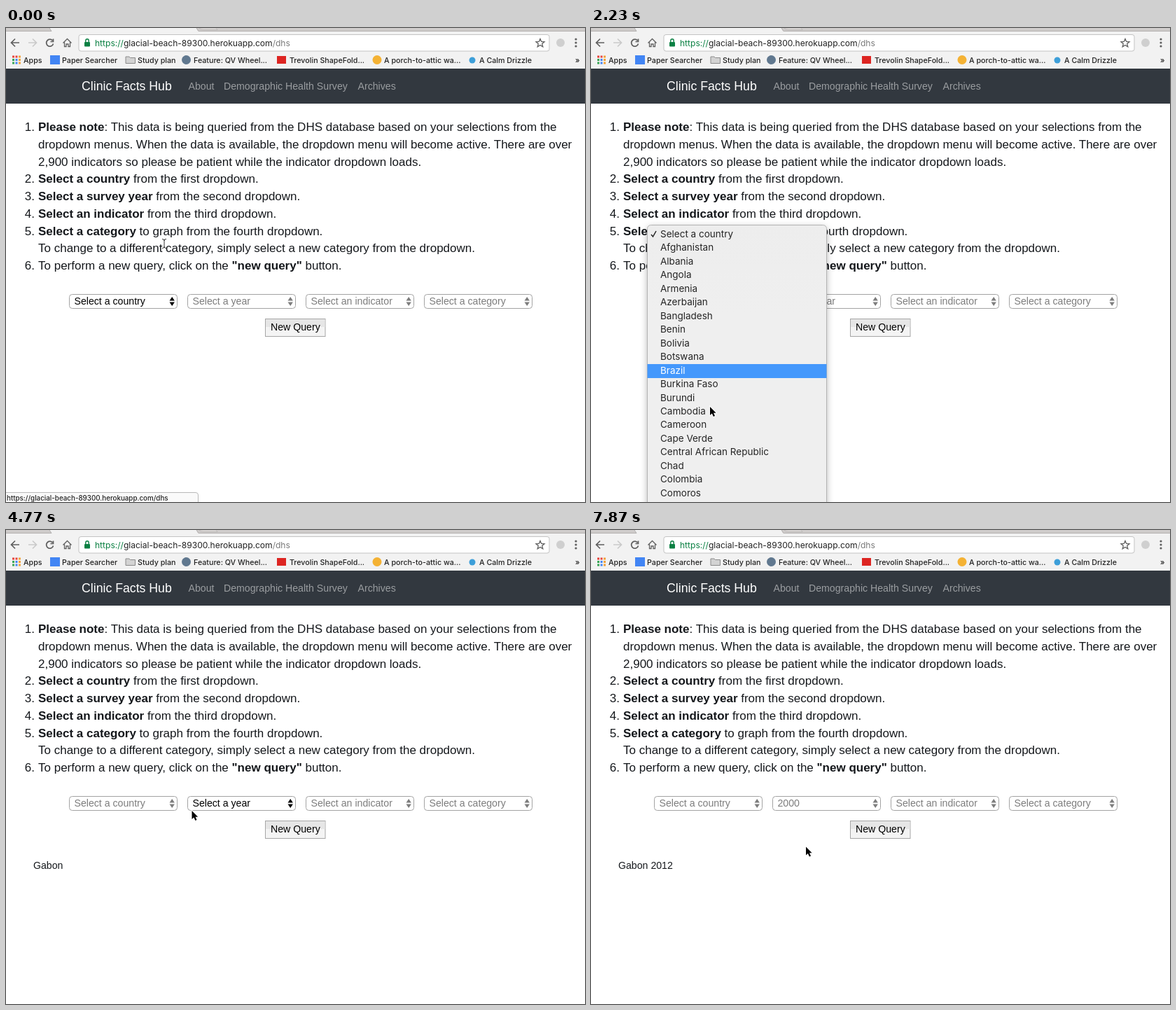
An HTML page for the animation above (8 s loop, 827 by 677 pixels).

```html
<!DOCTYPE html>
<html lang="en">
<head>
<meta charset="utf-8">
<title>Survey query form</title>
<style>
html, body { margin: 0; width: 100%; height: 100%; overflow: hidden; background: #fff; }
svg { display: block; width: 827px; height: 677px; }
.page { font: 14.15px "Liberation Sans", Arial, sans-serif; }
.list { font-size: 17px; fill: #15181c; }
.bold { font-weight: bold; }
.ui { font-family: Inter, Roboto, sans-serif; }
.marks { font-size: 10.7px; font-weight: 500; fill: #222; }
.menu { font: 13.5px Inter, Roboto, sans-serif; fill: #252525; }
.menu .on { fill: #fff; }
.panel { stroke: #b4b4b4; filter: drop-shadow(0 3px 5px rgba(0,0,0,.28)); }
.tick { fill: none; stroke: #222; stroke-width: 1.5; }
.line { fill: none; stroke: #5f5f5f; stroke-width: 1.7; }
.thin { stroke-width: 1.3; }
</style>
</head>
<body>
<svg viewBox="0 0 827 677">
  <defs>
    <linearGradient id="glass" gradientUnits="userSpaceOnUse" x1="0" y1="0" x2="0" y2="677">
      <stop offset="0" stop-color="#dedede"/>
      <stop offset=".07" stop-color="#e3e3e3"/>
      <stop offset=".1" stop-color="#d6d8d9"/>
      <stop offset=".135" stop-color="#d0d2d4"/>
      <stop offset=".17" stop-color="#e2e3e4"/>
      <stop offset=".22" stop-color="#ebebeb"/>
      <stop offset=".6" stop-color="#efefef"/>
    </linearGradient>
  </defs>
  <rect width="827" height="677" fill="#fff"/>

  <!-- browser window -->
  <g class="ui">
    <rect width="827" height="58" fill="#f2f2f2"/>
    <path d="M0 0H62L65 4.500H0ZM272 0H827V4.500H274Z" fill="#cfcccb"/>
    <path d="M0 4.500H65L62 0M272 0l3 4.500H827" fill="none" stroke="#b3b0af"/>
    <path d="M276 0h24l2 2.500h-20q-4 0-6-2.500" fill="#dedbd9" stroke="#b3b0af" stroke-width=".7"/>
    <path class="line" d="M19 21H8M13 15.500L7.500 21L13 26.500"/>
    <path class="line" style="stroke:#cacaca" d="M32 21H43M38 15.500L43.500 21L38 26.500"/>
    <path class="line" d="M66.500 18A5 5 0 1 0 67.500 22.500M67.500 15.500V19.500H63.500"/>
    <path class="line thin" d="M81.500 21.500L87.500 15.500L93.500 21.500M83.500 20.500V26.500H86V23H89V26.500H91.500V20.500"/>
    <rect x="104" y="9.500" width="672" height="23.500" rx="3" fill="#fff" stroke="#c3c3c3"/>
    <rect x="112" y="20" width="8" height="6.500" rx="1" fill="#0b8043"/>
    <path d="M113.800 20V18a2.200 2.200 0 0 1 4.400 0V20" fill="none" stroke="#0b8043" stroke-width="1.400"/>
    <text x="127" y="26" font-size="12.050" fill="#222"><tspan fill="#0b8043">https://</tspan>glacial-beach-89300.herokuapp.com<tspan fill="#7a7a7a">/dhs</tspan></text>
    <path class="line thin" d="M763 15.500l1.700 4 4.300.3-3.300 2.800 1.100 4.200-3.800-2.300-3.800 2.300 1.100-4.200-3.300-2.800 4.300-.3z"/>
    <circle cx="792" cy="21" r="6" fill="#cfcfcf"/>
    <g fill="#5f5f5f"><circle cx="814" cy="16" r="1.600"/><circle cx="814" cy="21" r="1.600"/><circle cx="814" cy="26" r="1.600"/></g>
    <g id="apps"></g>
    <rect x="63" y="39" width="14" height="13" fill="#4285f4"/>
    <path d="M171 50.500V41h5l1.500 1.500h7v8z" fill="#d3d3d3" stroke="#8a8a8a"/>
    <circle cx="257.500" cy="45.500" r="6.500" fill="#60788f"/>
    <rect x="387" y="40" width="13" height="11" fill="#dd2522"/>
    <circle cx="530" cy="45.500" r="6.500" fill="#f4b234"/>
    <circle cx="666" cy="46" r="4.500" fill="#3d9fd9"/>
    <g id="marks" class="marks"></g>
  </g>

  <!-- page -->
  <g class="page">
    <rect y="58" width="827" height="50" fill="#32383f"/>
    <text x="108" y="89" font-size="17.700" fill="#fff">Clinic Facts Hub</text>
    <g fill="#9a9da0">
      <text x="260.500" y="88">About</text>
      <text x="311" y="88">Demographic Health Survey</text>
      <text x="502.500" y="88">Archives</text>
    </g>
    <g id="list" class="list"></g>
    <g id="selects"></g>
    <rect x="370.500" y="415.500" width="85.500" height="25" fill="#f4f4f4" stroke="#a6a6a6"/>
    <rect x="371" y="416" width="84.500" height="11" fill="#e6e6e6"/>
    <text x="378" y="432">New Query</text>
    <text id="result" x="39" y="484" fill="#15181c"></text>
  </g>

  <g id="status" class="ui">
    <path d="M-1 663.500H271q3.500 0 3.500 3.500V678H-1Z" fill="#fafafa" stroke="#b9b9b9"/>
    <text x="1" y="674.500" font-size="9.800" font-weight="500" fill="#222">https://glacial-beach-89300.herokuapp.com/dhs</text>
  </g>

  <g id="countryMenu" class="menu"></g>
  <g id="yearMenu" class="menu"></g>

  <path id="beam" d="M-3 -6.500Q0 -6.500 0 -4.500Q0 -6.500 3 -6.500M0 -5V5M-3 6.500Q0 6.500 0 4.500Q0 6.500 3 6.500" fill="none" stroke="#333"/>
  <path id="arrow" d="M0 0V12L2.800 9.400L4.900 14L7 13.100L5 8.700H8.600Z" fill="#000" stroke="#fff" paint-order="stroke" stroke-width="1.800"/>
</svg>
<script>
const $ = id => document.getElementById(id);
const ROW = 19.47, FIRST_ROW = 390;

const countries = ('Select a country,Afghanistan,Albania,Angola,Armenia,Azerbaijan,Bangladesh,Benin,Bolivia,' +
  'Botswana,Brazil,Burkina Faso,Burundi,Cambodia,Cameroon,Cape Verde,Central African Republic,Chad,' +
  "Colombia,Comoros,Congo,Congo Democratic Republic,Cote d'Ivoire,Dominican Republic,Ecuador,Egypt," +
  'El Salvador,Equatorial Guinea,Eritrea,Ethiopia,Gabon,Gambia,Ghana,Guatemala,Guinea,Guyana,Haiti,' +
  'Honduras,India,Indonesia').split(',');
const years = ['Select a year', '2000', '2012'];
const GABON = countries.indexOf('Gabon');

const bookmarks = [[25, 'Apps'], [80, 'Paper Searcher'], [188, 'Study plan'], [268, 'Feature: QV Wheel...'],
  [405, 'Trevolin ShapeFold...'], [540, 'A porch-to-attic wa...'], [676, 'A Calm Drizzle'], [813, '»']];

const bold = s => `<tspan class="bold">${s}</tspan>`;
const instructions = [
  ['1.', bold('Please note') + ': This data is being queried from the DHS database based on your selections from the'],
  ['', 'dropdown menus. When the data is available, the dropdown menu will become active. There are over'],
  ['', '2,900 indicators so please be patient while the indicator dropdown loads.'],
  ['2.', bold('Select a country') + ' from the first dropdown.'],
  ['3.', bold('Select a survey year') + ' from the second dropdown.'],
  ['4.', bold('Select an indicator') + ' from the third dropdown.'],
  ['5.', bold('Select a category') + ' to graph from the fourth dropdown.'],
  ['', 'To change to a different category, simply select a new category from the dropdown.'],
  ['6.', 'To perform a new query, click on the ' + bold('"new query"') + ' button.'],
];

$('apps').innerHTML = ['#e8453c', '#e8453c', '#f2a33a', '#3aa757', '#4285f4', '#f2a33a', '#3aa757', '#4285f4', '#f2a33a']
  .map((c, i) => `<rect x="${9 + i % 3 * 4.5}" y="${39.5 + (i / 3 | 0) * 4.5}" width="3" height="3" fill="${c}"/>`).join('');
$('marks').innerHTML = bookmarks.map(([x, s]) => `<text x="${x}" y="49.5">${s}</text>`).join('');
$('list').innerHTML = instructions.map(([n, s], i) => {
  const y = Math.round(147 + i * 24.75);
  return `<text x="41" y="${y}" text-anchor="end">${n}</text><text x="46" y="${y}">${s}</text>`;
}).join('');

function selectBox(i, label, active, focused) {
  const x = 90.5 + i * 169, color = active ? '#000' : '#7d7d7d';
  const frame = `x="${x}" y="380.5" width="154" height="20" rx="4" fill="#fff"`;
  return (focused ? `<rect ${frame} stroke="#6ba7ee" stroke-width="4"/>` : '') +
    `<rect ${frame} stroke="#a3a3a3"/><text x="${x + 7}" y="395" fill="${color}">${label}</text>` +
    `<path d="M${x + 143} 389.500l3.700-5.500 3.700 5.500zm0 2l3.700 5.500 3.700-5.500z" fill="${color}"/>`;
}

function menu(items, x, width, height, scroll, lit, fill) {
  const top = FIRST_ROW - scroll;
  const rows = items.map((s, i) => {
    const y = top + i * ROW, on = i === lit;
    return (on ? `<rect x="${x}" y="${Math.round(y - 9)}" width="${width}" height="20" fill="#4498fc"/>` : '') +
      `<text x="${x + 18.5}" y="${Math.round(y + 4.9)}"${on ? ' class="on"' : ''}>${s}</text>`;
  });
  return `<rect class="panel" x="${x}" y="${top - 12.5}" width="${width}" height="${height}" rx="5" fill="${fill}"/>` +
    rows.join('') +
    `<path class="tick" d="M${x + 5.5} ${top + 1}l2.500 3 4.500-8"${lit === 0 ? ' style="stroke:#fff"' : ''}/>`;
}

// Each step changes part of the state; everything else carries over.
const steps = [
  [0, { at: [226, 308], beam: true, status: true, active: 0, result: '', year: years[0],
        country: 0, countryLit: 0, scroll: 0, fill: '#fdfdfd', yearOpen: 0, yearLit: 0, focus: false }],
  [150, { at: [220, 330] }],
  [290, { at: [208, 362], status: false }],
  [440, { at: [200, 388], beam: false }],
  [740, { country: 1 }],
  [1330, { at: [198.5, 404] }],
  [1480, { at: [193, 436], countryLit: 2 }],
  [1630, { at: [179, 497], countryLit: 5 }],
  [1780, { at: [170, 541], countryLit: 8 }],
  [2080, { scroll: 38, countryLit: 10, fill: 'url(#glass)' }],
  [2230, { scroll: 96 }],
  [2380, { scroll: 215, countryLit: 13 }],
  [2530, { scroll: 335, countryLit: 19 }],
  [2680, { scroll: 430, countryLit: GABON }],
  [3720, { countryLit: -1 }],
  [3870, { countryLit: GABON, country: .5 }],
  [4020, { country: 0, active: -1, result: 'Gabon' }],
  [4170, { active: 1 }],
  [4470, { at: [188, 512] }],
  [4620, { at: [236, 444] }],
  [4770, { at: [265.5, 401] }],
  [4920, { at: [270, 394] }],
  [5060, { at: [271, 391] }],
  [5210, { yearOpen: 1, focus: true }],
  [5800, { at: [272, 398] }],
  [5950, { at: [275, 408], yearLit: 1 }],
  [6090, { at: [278, 419] }],
  [6240, { at: [279, 427], yearLit: 2 }],
  [6530, { yearLit: -1 }],
  [6680, { yearLit: 2, yearOpen: .5 }],
  [6830, { yearOpen: 0, focus: false, active: -1, year: '2000', result: 'Gabon 2012' }],
  [7870, { at: [307, 452.5] }],
];

function draw(s) {
  const labels = [countries[0], s.year, 'Select an indicator', 'Select a category'];
  $('selects').innerHTML = labels.map((label, i) => selectBox(i, label, i === s.active, i === 1 && s.focus)).join('');
  $('result').textContent = s.result;
  $('status').style.display = s.status ? '' : 'none';
  $('countryMenu').innerHTML = s.country ? menu(countries, 80.5, 256, 1200, s.scroll, s.countryLit, s.fill) : '';
  $('countryMenu').style.opacity = s.country;
  $('yearMenu').innerHTML = s.yearOpen ? menu(years, 249.5, 156, 66, 0, s.yearLit, '#f0f0f0') : '';
  $('yearMenu').style.opacity = s.yearOpen;
  for (const id of ['beam', 'arrow']) {
    $(id).style.display = (id === 'beam') === s.beam ? '' : 'none';
    $(id).setAttribute('transform', `translate(${s.at})`);
  }
}

let shown = 0;
function tick() {
  const t = performance.now() % 8000;
  const past = steps.filter(([start]) => start <= t);
  if (past.length !== shown) {
    shown = past.length;
    draw(Object.assign({}, ...past.map(([, change]) => change)));
  }
  requestAnimationFrame(tick);
}
tick();
</script>
</body>
</html>
```
